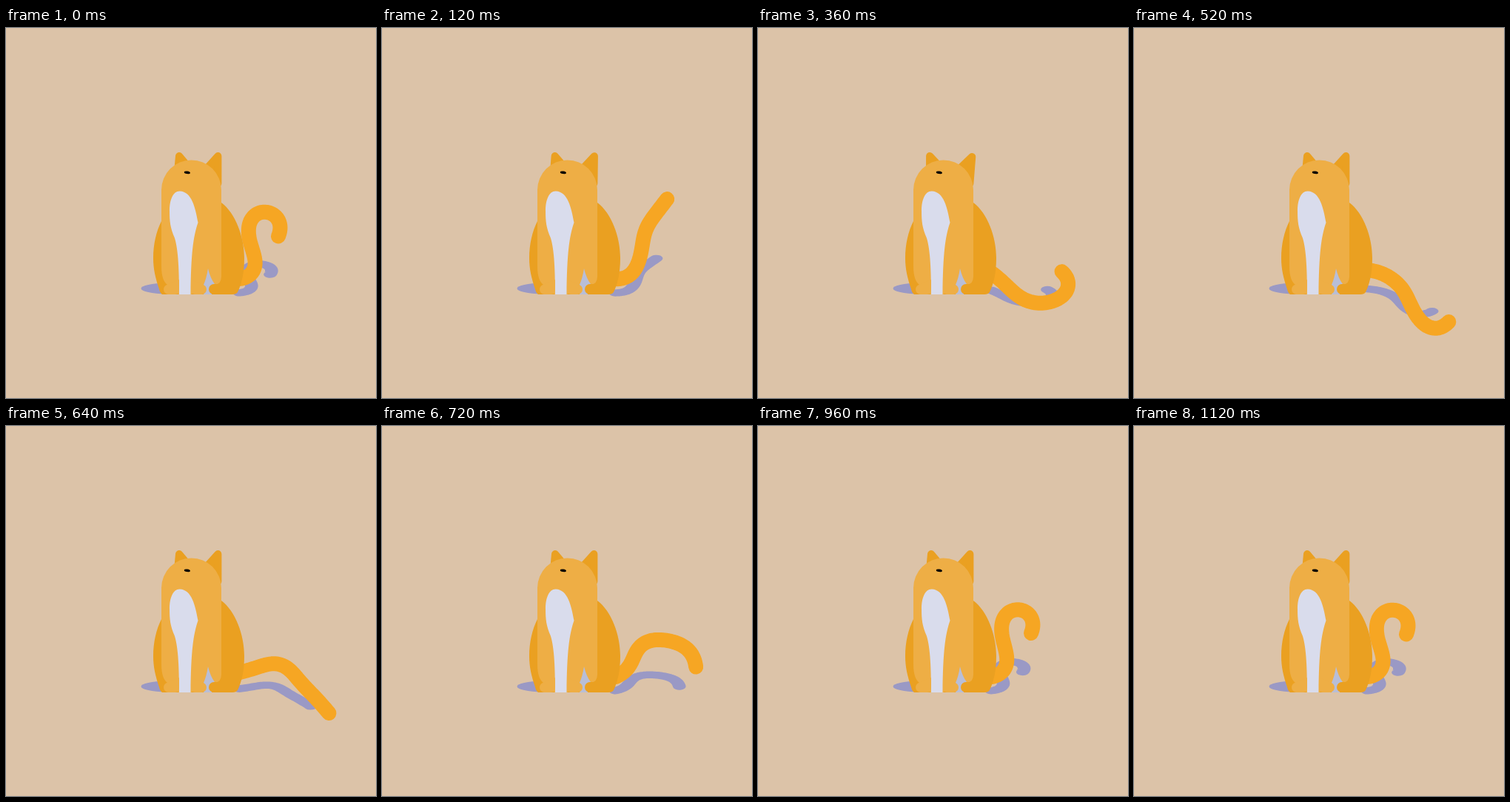
Write an HTML page with a canvas that moves like this. It is 500x500 px and loops after 1.32 s.

```html
<!DOCTYPE html>
<html lang="en">
<head>
<meta charset="utf-8">
<title>Cat wagging its tail</title>
<style>
html, body { margin: 0; width: 100%; height: 100%; overflow: hidden; background: #dcc3a8; }
canvas { display: block; width: 100%; height: 100%; }
</style>
</head>
<body>
<canvas id="stage" width="500" height="500"></canvas>
<script>
const ctx = document.getElementById('stage').getContext('2d');
const LOOP = 1320, STEP = 40;
const BG = '#dcc3a8', BACK = '#eaa021', FRONT = '#eeae45', TAIL = '#f6a623';
const CHEST = '#d9dcec', GAP = '#b8bed7', SHADE = '#9a99c5';

// a pose: root height, length, then headings in degrees from root to tip
const curl = [339, 160, -8, -101, -86, 14, 112];
const poses = [
  { t: 0, v: curl },
  { t: 200, v: [339.5, 124, 8, -24, -72, -93, -142] },
  { t: 360, v: [331, 149, 38, 42, 5, -42, -138] },
  { t: 520, v: [327, 148, 8, 37, 65, 38, -46] },
  { t: 560, v: [327, 150, 2, 34, 75, 55, -10] },
  { t: 720, v: [339, 150, -25, -66, -7, 27, 82] },
  { t: 840, v: [338, 164, -18, -88, -82, -18, 65] },
  { t: 960, v: [339, 158, -12, -98, -86, 12, 112] },
  { t: 1120, v: curl }
];

const clamp = (v, lo, hi) => Math.max(lo, Math.min(hi, v));
const smooth = (a, b, t) => { const u = clamp((t - a) / (b - a), 0, 1); return u * u * (3 - 2 * u); };

// cubic from a to b with end slopes m and n
const hermite = (a, b, m, n, u) =>
  a + (b - a) * u * u * (3 - 2 * u) + u * (1 - u) * ((1 - u) * m - u * n);

const rate = (i, c) => (poses[i + 1].v[c] - poses[i].v[c]) / (poses[i + 1].t - poses[i].t);

// monotone slope, so no value overshoots its pose
function slope(i, c) {
  if (i === 0 || i === poses.length - 1) return 0;
  const a = rate(i - 1, c), b = rate(i, c);
  return a * b <= 0 ? 0 : 2 * a * b / (a + b);
}

function poseAt(t) {
  if (t >= 1120) return curl;
  let i = 0;
  while (t >= poses[i + 1].t) i++;
  const p = poses[i], q = poses[i + 1], d = q.t - p.t;
  return p.v.map((v, c) =>
    hermite(v, q.v[c], d * slope(i, c), d * slope(i + 1, c), (t - p.t) / d));
}

// walk from the root, turning along a smooth curve through the headings
function tailPath([rootY, len, ...turns]) {
  const STEPS = 64, last = turns.length - 1;
  const at = i => turns[clamp(i, 0, last)];
  const path = new Path2D();
  let x = 316, y = rootY;
  path.moveTo(x, y);
  for (let k = 0; k < STEPS; k++) {
    const s = (k + 0.5) / STEPS * last, i = Math.floor(s);
    const deg = hermite(at(i), at(i + 1),
      (at(i + 1) - at(i - 1)) / 2, (at(i + 2) - at(i)) / 2, s - i);
    x += Math.cos(deg * Math.PI / 180) * len / STEPS;
    y += Math.sin(deg * Math.PI / 180) * len / STEPS;
    path.lineTo(x, y);
  }
  return path;
}

function stroke(path, color, width) {
  ctx.strokeStyle = color;
  ctx.lineWidth = width;
  ctx.lineCap = ctx.lineJoin = 'round';
  ctx.stroke(path);
}

function fill(d, color) {
  const path = new Path2D(d);
  ctx.fillStyle = color;
  ctx.fill(path);
  return path;
}

function oval(x, y, rx, ry, color, turn = 0) {
  ctx.fillStyle = color;
  ctx.beginPath();
  ctx.ellipse(x, y, rx, ry, turn, 0, 2 * Math.PI);
  ctx.fill();
}

const ear = d => stroke(fill(d, BACK), BACK, 10);

function drawBody(t) {
  fill('M211 360Q208 358 207 353C202 338 199 326 199 311C199 292 203 275 210 261V225L291 236' +
    'C310 250 322 282 322 311C322 332 318 347 313 357Q311 360 306 360Z', BACK);

  const k = smooth(40, 340, t) * (1 - smooth(340, 500, t));
  ear(`M${234 - 2 * k} 173L232 195L250 192Z`);
  ear(`M${286.4 + 3 * k} ${173 + k}L286.4 210L262 200Z`);

  fill('M210 219A40.5 40.5 0 0 1 291 219V336Q291 346 282 347L250 360H233L218 347Q210 341 210 322Z', FRONT);
  fill('M235 220.5C251 221 256 243 259.5 263C253 282 250 305 249.5 360H234' +
    'C234 330 233 300 228 284C222 270 221 262 221 247C221 232 226 220 235 220.5Z', CHEST);
  fill('M273 325Q276 338 282 346L278 360H267V347Q271 338 273 325Z', GAP);

  // paws
  fill('M234 340V354Q234 360 228 360H219A6.8 6.8 0 0 1 219 346.5Z', FRONT);
  fill('M250 340V354Q250 360 256 360H265A6.8 6.8 0 0 0 265 346.5Z', FRONT);
  fill('M281 346H300V360H281A7 7 0 0 1 281 346Z', BACK);

  const blink = smooth(120, 200, t) * (1 - smooth(200, 280, t));
  oval(244.8, 195.3, 4.1, 1.7 - 0.3 * blink, '#000', 0.15);
}

function draw(t) {
  ctx.fillStyle = BG;
  ctx.fillRect(0, 0, 500, 500);
  const tail = tailPath(poseAt(t));

  oval(216, 352, 33.5, 7.2, SHADE);
  ctx.save();
  ctx.transform(0.8, 0, 0, 0.43, 62.5, 212);
  stroke(tail, SHADE, 22);
  ctx.restore();

  stroke(tail, TAIL, 20);
  drawBody(t);
}

function tick(now) {
  draw(Math.floor((now % LOOP) / STEP) * STEP);
  requestAnimationFrame(tick);
}
draw(0);
requestAnimationFrame(tick);
</script>
</body>
</html>
```
